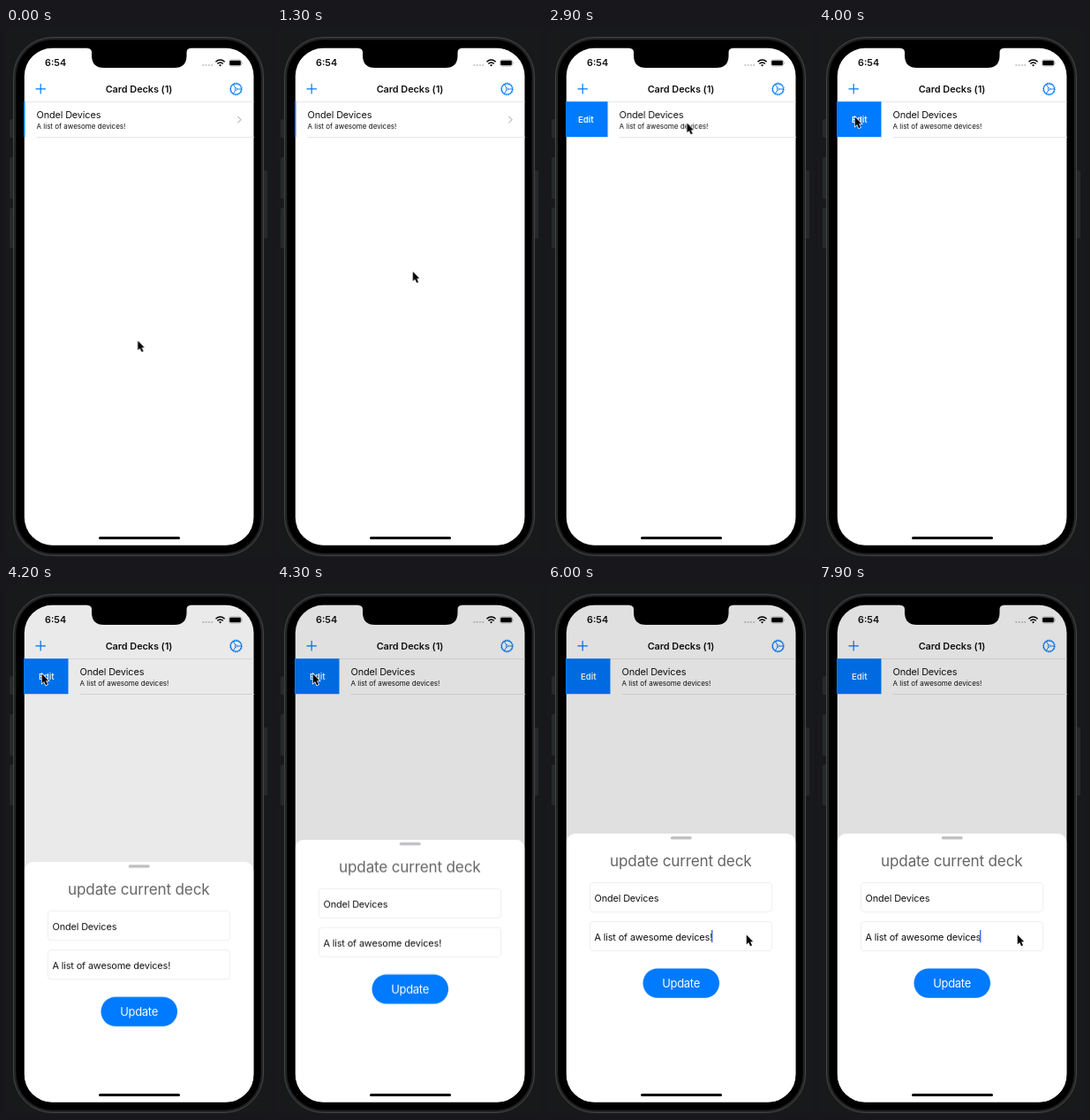
Animation, 300 px wide and 598 px high, one loop 8 s. Source, as an HTML page:

```html
<!DOCTYPE html>
<html lang="en">
<head>
<meta charset="utf-8">
<title>Card decks</title>
<style>
  html, body { margin: 0; width: 100%; height: 100%; overflow: hidden; background: #17191b; }
  svg { display: block; width: 100vw; height: 100vh; }
  text { font: 400 10.95px Inter, "Open Sans", sans-serif; letter-spacing: -.015em; fill: #111; }
  .time { font-size: 10.8px; font-weight: 600; letter-spacing: 0; }
  .bar { font-size: 10.9px; font-weight: 600; letter-spacing: -.004em; }
  .note { font-size: 8px; letter-spacing: 0; }
  .edit { font-size: 9.6px; font-weight: 600; letter-spacing: 0; fill: #fff; }
  .heading { font-size: 17.1px; letter-spacing: -.01em; fill: #666; }
  .action { font-size: 12.9px; letter-spacing: -.02em; fill: #fff; }
  .mid { text-anchor: middle; }
  .icon { fill: none; stroke: #007aff; stroke-width: 1.2; }
  .field { fill: #fff; stroke: #efeff0; stroke-width: 1; }
  .key { fill: #27282a; }
</style>
</head>
<body>
<svg viewBox="0 0 300 598" preserveAspectRatio="none">
  <defs>
    <clipPath id="screen"><rect x="20.8" y="22.8" width="259.6" height="561.8" rx="31.5"/></clipPath>
  </defs>

  <!-- Device -->
  <rect width="300" height="598" fill="#17191b"/>
  <g class="key">
    <rect x="4" y="103" width="6" height="21" rx="1.5"/>
    <rect x="4" y="146" width="6" height="47" rx="1.5"/>
    <rect x="4" y="203" width="6" height="46" rx="1.5"/>
    <rect x="290" y="161" width="6" height="77" rx="1.5"/>
  </g>
  <rect x="8.5" y="10.5" width="283" height="586" rx="44" fill="#232426" stroke="#434446"/>
  <rect x="11.5" y="13.5" width="277" height="580" rx="41" fill="#000" stroke="#0b0b0c"/>

  <g clip-path="url(#screen)">
    <rect x="20" y="22" width="261" height="563" fill="#fff"/>

    <!-- Status bar -->
    <text class="time" x="44" y="43.4">6:54</text>
    <g fill="#c4c4c6">
      <circle cx="223.3" cy="42" r="1.1"/><circle cx="226.6" cy="42" r="1.1"/>
      <circle cx="229.9" cy="42" r="1.1"/><circle cx="233.2" cy="42" r="1.1"/>
    </g>
    <g fill="none" stroke="#000" stroke-width="1.5">
      <path d="M237.4 38.3Q242.5 33.8 247.6 38.3"/>
      <path d="M239.3 40.4Q242.5 37.6 245.7 40.4"/>
    </g>
    <path d="M240.9 41.8Q242.5 40.6 244.1 41.8L242.5 43.5Z"/>
    <rect x="252.4" y="35.9" width="14.2" height="7.2" rx="2.2" fill="none" stroke="#aaa" stroke-width=".7"/>
    <rect x="253.2" y="36.7" width="12.6" height="5.6" rx="1.4"/>
    <path d="M267.4 38.3q1.3 1.2 0 2.5z" fill="#999"/>

    <!-- Navigation bar -->
    <path class="icon" d="M33.5 68.8H44.9M39.2 63.1V74.5"/>
    <text class="bar mid" x="150.5" y="73">Card Decks (1)</text>
    <g class="icon" transform="translate(260.4 69)">
      <circle r="6.1" stroke-width="1.1"/>
      <circle r="7" stroke-width=".8" stroke-dasharray="1.3 1.449"/>
      <circle r="1.2" stroke-width=".8"/>
      <path d="M1.2 0H6M-.6 -1L-3 -5.2M-.6 1L-3 5.2" stroke-width=".9"/>
    </g>
    <path d="M20 83.5H281" stroke="#e3e3e5" stroke-width=".8"/>

    <!-- Deck row -->
    <g id="row">
      <rect x="-100" y="83.2" width="121.5" height="40" fill="#007aff"/>
      <text class="edit mid" x="-3.2" y="107">Edit</text>
      <text x="34.5" y="101.8">Ondel Devices</text>
      <text class="note" x="34.5" y="113.8">A list of awesome devices!</text>
      <path d="M262.3 100L266 103.7L262.3 107.4" fill="none" stroke="#c0c0c3" stroke-width="1.2"/>
      <path d="M34.5 123.5H281" stroke="#e0e0e2" stroke-width=".8"/>
    </g>

    <rect id="dim" x="20" y="22" width="261" height="563" opacity="0"/>

    <!-- Update sheet -->
    <g id="sheet" transform="translate(0 320)">
      <rect x="20.8" y="281" width="259.6" height="340" rx="10" fill="#fff"/>
      <rect x="138.7" y="284.3" width="24" height="3.2" rx="1.6" fill="#bfbfc2"/>
      <text class="heading mid" x="150.3" y="318.4">update current deck</text>
      <rect class="field" x="47.5" y="336.5" width="206" height="33" rx="3.5"/>
      <text x="52.5" y="357.5">Ondel Devices</text>
      <rect class="field" x="47.5" y="380.5" width="206" height="33" rx="3.5"/>
      <text x="52.5" y="401.5">A list of awesome devices<tspan id="mark">!</tspan></text>
      <rect id="caret" x="185" y="390" width="1.4" height="14" fill="#3d6bea" opacity="0"/>
      <rect x="107.5" y="433.5" width="86.5" height="33.3" rx="16.6" fill="#007aff"/>
      <text class="action mid" x="150.6" y="455">Update</text>
    </g>

    <rect x="105" y="575" width="92" height="3" rx="1.5"/>
  </g>

  <!-- Notch -->
  <path d="M92 22H209V23Q204.5 23 204.5 27.5V31Q204.5 45 190.5 45H111Q97 45 97 31V27.5Q97 23 92 23Z"/>

  <path id="cursor" d="M.7 .5V11.2L3.1 9L5.1 13.2L7 12.3L5.1 8.2H8.2Z"
        stroke="#fff" stroke-width="1.4" paint-order="stroke"/>
</svg>
<script>
const LOOP = 8000;

// Each step is [time in ms, value]; the last value holds to the end of the loop.
function play(id, steps, style, easing = 'linear') {
  const all = [...steps, [LOOP, steps.at(-1)[1]]];
  const frames = all.map(([time, value]) => ({ offset: time / LOOP, easing, ...style(value) }));
  document.getElementById(id).animate(frames, { duration: LOOP, iterations: Infinity });
}

const shift = ([x, y]) => ({ transform: `translate(${x}px, ${y}px)` });
const slideX = x => shift([x, 0]);
const slideY = y => shift([0, y]);
const fade = opacity => ({ opacity });

// Eased pointer travel, sampled into short straight segments.
function glide(start, end, from, to) {
  return Array.from({ length: 9 }, (_, i) => {
    const p = i / 8, e = p * p * (3 - 2 * p);
    return [start + (end - start) * p, from.map((v, k) => v + (to[k] - v) * e)];
  });
}

// Critically damped spring: share of the distance still to go.
const spring = s => (1 + 19 * s) * Math.exp(-19 * s);
const rise = Array.from({ length: 33 }, (_, i) => [4000 + i * 25, spring(i * .025)]);

const idle = [148.5, 353], onRow = [163, 107.5], onEdit = [40, 100], onField = [224, 395];

play('cursor', [
  [0, idle], ...glide(1000, 1800, idle, onRow),
  [2500, onRow], [2700, [113, 107]], [2900, [156.5, 107]], [3100, [172, 106]],
  [3300, [172, 105]], [3400, [105, 102]], [3500, onEdit],
  ...glide(4900, 5600, onEdit, onField)
], shift);

play('row', [
  [0, 0], [2700, 0], [2800, 22], [2900, 46], [3000, 58],
  [3100, 60], [3200, 52], [3300, 49]
], slideX);

play('sheet', [[0, 1], ...rise, [4801, 0]], left => slideY(left * 303));
play('dim', [[0, 0], [4000, 0], [4300, .12]], fade);

play('caret', [
  [0, 0], [5500, 0], [5501, 1], [6480, 1], [6600, 0], [6880, 0],
  [7080, 1], [7480, 1], [7600, 0], [7899, 0], [7900, 1]
], fade);
play('caret', [[0, 0], [7900, -3]], slideX, 'step-end');
play('mark', [[0, 1], [7900, 0]], value => ({ fillOpacity: value }), 'step-end');
</script>
</body>
</html>
```
